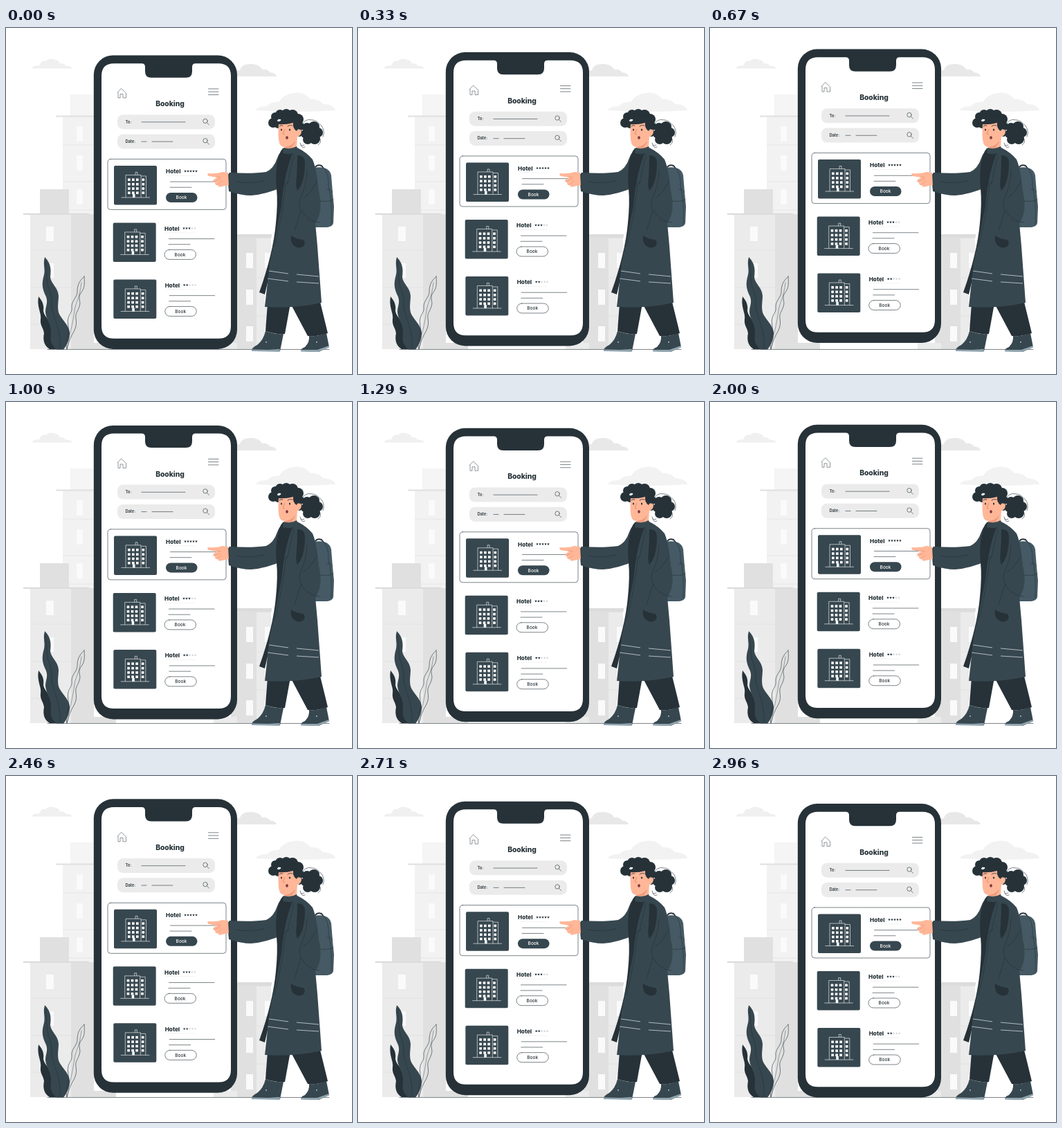
Write an HTML page that moves like this. It is 500 by 500 pixels and loops after 3 s.

```html
<!DOCTYPE html>
<html lang="en">
<head>
<meta charset="utf-8">
<title>Booking</title>
<style>
  html, body { margin: 0; width: 100%; height: 100%; overflow: hidden; background: #fff; }
  svg { display: block; width: 100%; height: 100%; }
  text { font-family: Inter, "Open Sans", sans-serif; fill: #263238; }
  .bold { font-weight: 800; }
  .label { font-size: 5.7px; font-weight: 600; }
  .button { font-size: 6.5px; font-weight: 500; text-anchor: middle; }
  .line { fill: none; stroke: #263238; stroke-width: .6; stroke-linecap: round; stroke-linejoin: round; }
  .pale { fill: none; stroke: #e0e0e0; stroke-width: .8; }
  .ink { fill: #263238; }
  .coat { fill: #37474f; }
  .steel { fill: #455a64; }
  .skin { fill: #ffb798; }
</style>
</head>
<body>
<svg viewBox="0 0 500 500">
  <g id="clouds">
    <path fill="#f0f0f0" d="M37 58.5q3-5 11-4q2-8 10-7q5-5 12-2q7 1 8 6q6-1 8 3q8 0 10 4z"/>
    <path fill="#e8e8e8" d="M326 70q2-9 12-9q2-9 16-9q12 0 16 8q8-1 11 4q9 1 10 6z"/>
    <path fill="#f2f2f2" d="M361 119q2-6 16-6q6-7 17-6q7-11 21-13q16-3 25 9q13-1 18 7q16 1 18 9q-55 4-115 0z"/>
  </g>

  <g id="city">
    <path fill="#f5f5f5" d="M93 96h40v32H93z"/>
    <path fill="#f2f2f2" d="M82 128h60v142H82z"/>
    <path fill="#e0e0e0" d="M72 126.5h60v2H72z"/>
    <path class="pale" d="M82 169h50M82 222h50M82 263h50"/>
    <path fill="#e0e0e0" d="M49 233h42v36H49z"/>
    <path fill="#ebebeb" d="M35 269h92v195H35z"/>
    <path fill="#e0e0e0" d="M94 269h33v186h32v9H94z"/>
    <path fill="#dcdcdc" d="M25 267.8h95v2.2H25z"/>
    <path class="pale" d="M35 321h90M35 375h90M35 428h90"/>
    <path fill="#e0e0e0" d="M325 300h58v164h-58z"/>
    <path fill="#ebebeb" d="M362 304h21v160h-21zM300 455h34v9h-34z"/>
    <path fill="#dcdcdc" d="M330 298h54v4.500h-54z"/>
    <path class="pale" d="M333 361h50M333 416h50"/>
    <g id="windows" fill="#fafafa"></g>
  </g>

  <g id="plants">
    <path class="ink" d="M47 388c7 8 8 14 7 21c2 10 10 12 11 24c1 10 6 18 9 31h-11c-8-5-10-13-8-23c-1-8-6-11-5-20c2-8-6-18-3-33z"/>
    <path class="coat" d="M56 331c10 10 9 20 8 29c1 10 11 14 12 27c0 8-2 15 0 24c3 9 15 18 16 29c0 9-3 17-9 24.500h-10c-9-7-9-14-8-22c2-13-7-20-8-32c0-8 4-14 1-22c-7-14-6-21-3-32c2-9-2-16 1-25z"/>
    <path class="line" d="M57 336c2 16 1 25 4 38c7 16 4 22 6 34c4 16 12 28 11 54"/>
    <path class="line" d="M113 359c1 13 0 18-5 24c-5 8 1 12-2 19c-2 8-6 9-5 18c2 11-2 17-6 24c-4 8-5 13-7 20c-2-8 0-14 2-21c2-8-2-16 0-24c2-7 6-8 5-17c0-8 8-13 8-21c0-12 5-17 10-22z"/>
    <path class="line" d="M109 368c-3 24-8 28-10 40c-2 14-4 24-7 36l-4 20" style="stroke-width:.4"/>
  </g>

  <path class="line" d="M60 464.500H467"/>

  <g id="phone">
    <rect class="ink" x="126.800" y="40" width="207.200" height="424.500" rx="28"/>
    <path fill="#fff" d="M156 51.700h40q5 0 5 5v6.500q0 9 9 9h50q9 0 9-9v-6.500q0-5 5-5h33q18 0 18 18v361.500q0 18-18 18H156q-18 0-18-18V69.700q0-18 18-18z"/>
    <path class="line" style="stroke-width:.5" d="M161 94l5.500-6l7 6.500v7h-4.500v-5.500h-4v5.500h-3v-7.500"/>
    <path class="line" d="M292.500 88.500h14.500M292.500 92.700h14.500M292.500 97h14.500"/>
    <text class="bold" x="237" y="113.700" font-size="10.300" text-anchor="middle">Booking</text>
    <g id="fields"></g>
    <rect class="line" x="147" y="190" width="171" height="73" rx="4"/>
    <g id="cards"></g>
  </g>

  <g id="traveller">
    <!-- legs and boots -->
    <path class="ink" d="M378 398h33l-8 44q-14 1-28-4zM411 398l43-2l11 45q-12 5-29 4z"/>
    <path class="coat" d="M375 438q13 5 26 4l-5 25l-41-1q0-4 8-8q9-7 12-20zM438 445q14 1 25-4l4 20l-15 7l-26-1q0-4 6-6q7-7 6-16z"/>
    <path fill="#90a4ae" d="M355 464.500l24 .5l17-1l-1 4l-40-1zM426 465l24 0l17-6v2.500l-16 6.500l-25-.5z"/>
    <circle cx="376" cy="454" r="1" fill="#b0bec5"/><circle cx="449" cy="454" r="1" fill="#b0bec5"/>

    <!-- backpack -->
    <path class="line" d="M447 201q3-4 9-2l3 4" style="stroke-width:2"/>
    <path class="steel" d="M444 202q23-4 26 11l2 25l2 20l-1 24q-1 5-9 6h-18z"/>
    <path class="line" d="M459 202q8 9 7 26q6 24 4 55M454 250q12 2 19-2M464 233q6 0 8 4"/>

    <!-- far sleeve, sweater and lining, coat -->
    <path class="coat" d="M402 176q-7 3-10 12q-5 15-16 20q-20 3-53 1l-3 4l2 23q18 6 32 6q20-1 48-13z"/>
    <path class="ink" d="M400 174h20l-8 60q-22 80-38 151l-8-3q20-56 24-100q3-30 1-50q-3-34 6-54z"/>
    <path class="coat" d="M421 173l-9 12q-10 28-14 72q-8 42-17 83l-7 63q41 3 82-6l-6-82l-3-33q12-17 5-46q-3-32-9-46q-8-10-22-17z"/>
    <path class="ink" d="M421 184q10-1 11 10q0 18-4 29q-3 8-7 12q-3-8-1-19q1-16 1-32z"/>
    <path class="line" d="M412 186q-9 22-11 42l8-8l-5 8q-5 46-16 88M416 184l-8 34M323 210q-3 12 1 25M332 222q20 4 41-1M435 207q-1 22-9 37q-4 10 0 19q10 17 27 18M449 222q-8 17-20 24M426 264l-9 29"/>
    <path class="ink" d="M412 300q-2 11 6 16q8 4 13-2q2-6-2-8q-10-1-17-6z"/>
    <path fill="none" stroke="#cfd8dc" stroke-width=".8" d="M380 351l28 4M420 356l32 3M378 362l30 4M420 367l32 2"/>

    <!-- hand -->
    <path class="skin" d="M321 209l-9-1q-7 3-20 2q-2 2 1 4l12 2l-6 4q0 3 3 3q0 5 4 4q1 4 6 2l10-2z"/>
    <path fill="none" stroke="#e58d70" stroke-width=".6" d="M304 215l7 1M301 222l8-4M306 226l6-5"/>

    <!-- head -->
    <g id="curls" class="ink"></g>
    <path class="skin" d="M394 138q-1 14 0 23q1 11 8 11v4q10 4 18-4l1-15q5-1 6-7q-1-6-7-4q-4-3-5-12q-13 1-21 4z"/>
    <path fill="#e99a7c" d="M404 172q9-1 14-9q-2 11-14 12z"/>
    <path class="ink" d="M391 139q8-10 24-10l10-1v19q-4-2-5 2q-6-4-5-12q-10 3-24 2z"/>
    <path class="coat" d="M401 173q10 3 19-2l3 8q-10 5-23 2z"/>
    <path class="line" style="stroke-width:.8" d="M395 142q2-2 5-1M407 142q3-3 7-1"/>
    <path fill="none" stroke="#df8063" stroke-width=".8" d="M403 146l-3 7q1 1 3 1"/>
    <ellipse class="ink" cx="398" cy="147" rx="1" ry="1.500"/>
    <ellipse class="ink" cx="410" cy="147" rx="1.100" ry="1.600"/>
    <ellipse fill="#7c3838" cx="406" cy="158.500" rx="1.800" ry="2.300"/>
    <path class="line" d="M428 142q2-12 15-9q8 1 10 7M454 139q8 8 4 18M452 158q6 6-1 11M425 166q1 6 6 3M432 172q-5 2-6-3"/>
  </g>
</svg>
<script>
  const $ = id => document.getElementById(id);
  const rect = (x, y, w, h, extra = '') => `<rect x="${x}" y="${y}" width="${w}" height="${h}" ${extra}/>`;
  const circle = (x, y, r, extra = '') => `<circle cx="${x}" cy="${y}" r="${r}" ${extra}/>`;
  const grid = (xs, ys, w, h) => xs.map(x => ys.map(y => rect(x, y, w, h)).join('')).join('');

  $('windows').innerHTML =
    grid([102], [142, 184, 233], 9, 22) +
    grid([58], [287, 340, 394], 11, 21) +
    grid([347, 374], [325, 378, 431], 10, 22);

  $('curls').innerHTML = [
    [386, 137, 7], [389, 128, 6], [396, 125, 7], [405, 124, 7], [414, 126, 8],
    [422, 132, 8], [425, 142, 6], [424, 152, 5], [406, 132, 9], [393, 140, 5],
    [435, 144, 7], [445, 143, 8], [451, 151, 7], [446, 160, 8], [436, 161, 7], [432, 153, 6], [442, 152, 9]
  ].map(c => circle(...c)).join('');

  function field(y, label, dashes) {
    return rect(161, y, 141, 21, 'rx="8" fill="#ebebeb"') +
      `<text class="label" x="172.500" y="${y + 12.4}">${label}</text>` +
      dashes.map(([a, b]) => `<path class="line" d="M${a} ${y + 10.7}H${b}"/>`).join('') +
      `<g class="line">${circle(288, y + 9.3, 3.2)}<path d="M290.500 ${y + 11.8}l3 3"/></g>`;
  }
  $('fields').innerHTML = field(125.7, 'To:', [[196, 259]]) +
    field(154, 'Date:', [[196, 203], [211, 241]]);

  function star(cx, cy, fill) {
    const points = Array.from({ length: 10 }, (_, i) => {
      const r = i % 2 ? .85 : 1.9, a = i * Math.PI / 5;
      return `${cx + r * Math.sin(a)},${cy - r * Math.cos(a)}`;
    });
    return `<polygon points="${points.join(' ')}" fill="${fill}"/>`;
  }

  const picture = rect(0, 0, 62, 56.5, 'rx="2" class="coat"') +
    `<path fill="none" stroke="#fff" stroke-width=".6" d="M10.500 46H52M17 46V13.500H39V46M39 15h7.500v31M31 13.500v-4h3v4"/>
     <g fill="#fff">${grid([20, 26, 32, 40.5], [18.5, 25, 31.3, 37.5], 3.6, 3.6)}${rect(27, 41, 3.5, 5)}</g>`;

  function card(x, y, textX, rating, solid) {
    const button = solid ? 'coat' : 'line';
    return `<g transform="translate(${x} ${y})">${picture}</g>
      <g transform="translate(${textX} ${y})">
        <text class="bold" y="11.300" font-size="8.200">Hotel</text>
        ${[0, 1, 2, 3, 4].map(i => star(28 + i * 4, 8, i < rating ? '#263238' : '#d5d5d5')).join('')}
        <path class="pale" d="M2 14.500h42" style="stroke-width:.4"/>
        <path class="line" d="M6.500 23.200h65.500M6 31.300h31"/>
        ${rect(0, 39, 45.5, 14, `rx="7" class="${button}"`)}
        <text class="button" x="22.500" y="48.300" ${solid ? 'style="fill:#fff"' : ''}>Book</text>
      </g>`;
  }
  $('cards').innerHTML = card(156, 199.5, 231, 5, true) +
    card(154.7, 282, 229, 3, false) + card(155.3, 364, 229.7, 2, false);

  const LOOP = 3000, FLOAT = 1500, STEP = 1000 / 24, HEIGHT = 10;

  // The phone rises and sinks at constant speed, in 24 steps per second.
  function draw(ms) {
    const step = Math.floor((ms % LOOP + 5) / STEP) + 1;
    const phase = step * STEP % FLOAT / FLOAT;
    const rise = HEIGHT * (1 - Math.abs(2 * phase - 1));
    $('phone').setAttribute('transform', `translate(0 ${-rise.toFixed(3)})`);
  }

  const start = performance.now();
  function tick() {
    draw(performance.now() - start);
    requestAnimationFrame(tick);
  }
  tick();
</script>
</body>
</html>
```
